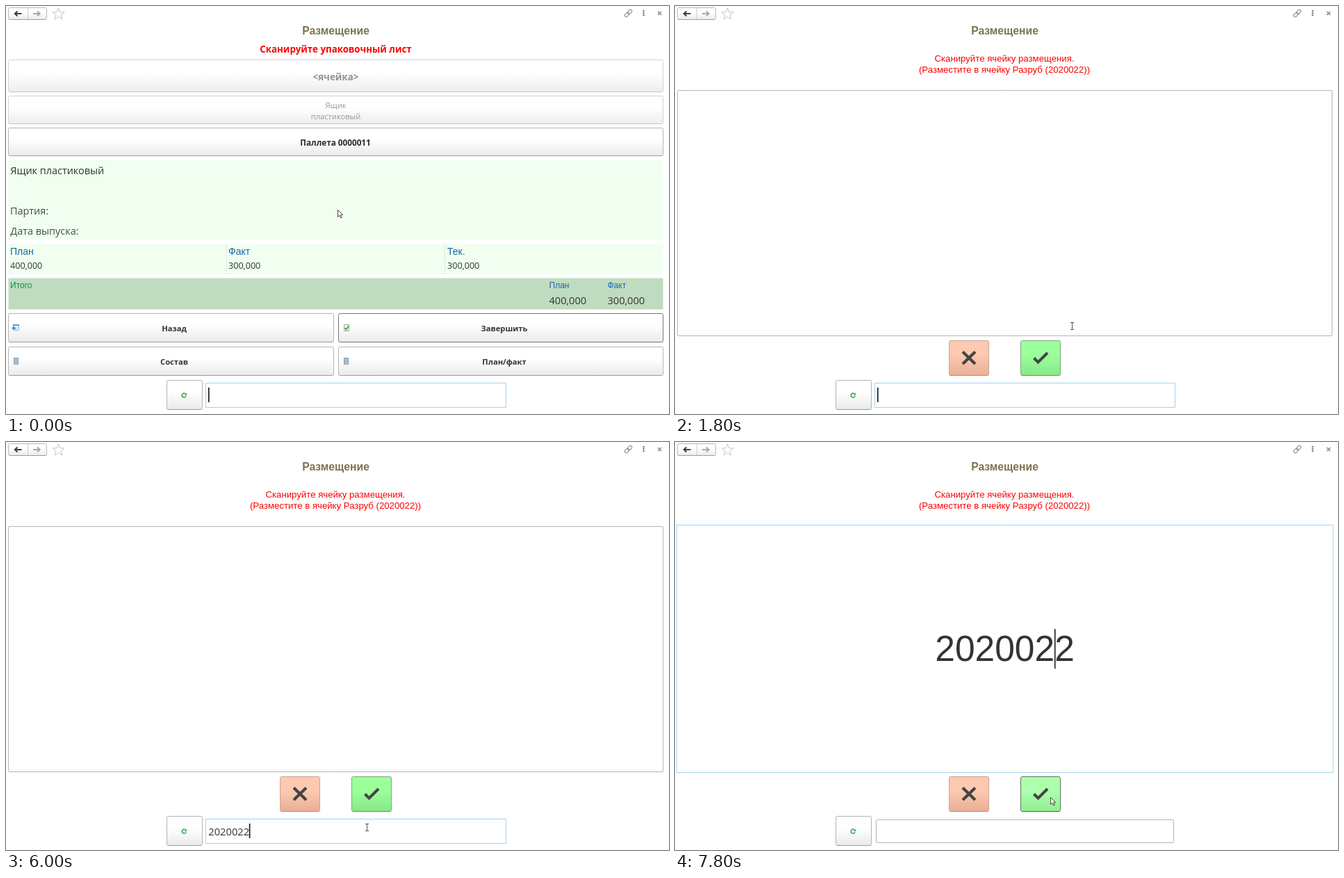
Recreate the animation shown at these times as an HTML page with a canvas. Size 954x587 px, loop 8 s.

```html
<!DOCTYPE html>
<html lang="ru">
<head>
<meta charset="utf-8">
<title>Размещение</title>
<style>
html, body { margin: 0; width: 100%; height: 100%; overflow: hidden; background: #fff; }
canvas { display: block; width: 954px; height: 587px; }
</style>
</head>
<body>
<canvas id="stage" width="954" height="587"></canvas>
<script>
const g = document.getElementById('stage').getContext('2d');
const LOOP = 8000;
const UI = '"Open Sans", "Noto Sans", sans-serif';
const ARIAL = '"Liberation Sans", Arial, sans-serif';
const CODE = '2020022';

// [start time, value...]; each row holds until the next one
const POINTER = [
  [0, 'arrow', 477, 293], [400, 'arrow', 482, 307], [600, 'arrow', 544, 417],
  [800, 'arrow', 567, 456], [1000, 'arrow', 569, 459], [1600, 'beam', 571, 460],
  [2600, 'arrow', 522, 531], [2800, 'beam', 519, 554], [3000, 'beam', 519, 556],
  [3200, 'beam', 519, 554], [6800, 'arrow', 542, 531], [7000, 'arrow', 555, 518],
  [7200, 'beam', 562, 419], [7400, 'beam', 563, 416], [7600, 'beam', 564, 434],
  [7800, 'arrow', 540, 511]
];
const TYPED = [[0, 0], [3600, 1], [3800, 2], [4800, 3], [5400, 4], [5600, 5], [6000, 7]];
const HOVER = [[0, false], [2400, true], [2800, false], [7800, true]];

const at = (rows, t) => rows.filter(r => r[0] <= t).pop().slice(1);

function text(str, x, y, font, color, align = 'left') {
  g.font = font;
  g.fillStyle = color;
  g.textAlign = align;
  g.fillText(str, x, y);
}

function rect(x, y, w, h, color) {
  g.fillStyle = color;
  g.fillRect(x, y, w, h);
}

function line(points, color, width, closed) {
  g.beginPath();
  points.forEach(([x, y]) => g.lineTo(x, y));
  if (closed) g.closePath();
  g.strokeStyle = color;
  g.lineWidth = width;
  g.stroke();
}

function frame(x, y, w, h, border, fill = '#fff', radius = 1.5) {
  g.beginPath();
  g.roundRect(x + .5, y + .5, w - 1, h - 1, radius);
  g.fillStyle = fill;
  g.fill();
  g.strokeStyle = border;
  g.lineWidth = 1;
  g.stroke();
}

function button(x, y, w, h, border = '#b4b4b4', top = '#fff', bottom = '#eaeaea', foot = '#9c9c9c') {
  const fill = g.createLinearGradient(0, y, 0, y + h);
  fill.addColorStop(0, top);
  fill.addColorStop(.4, top);
  fill.addColorStop(1, bottom);
  frame(x, y, w, h, border, fill, 2);
  rect(x + 2, y + h - 1, w - 4, 1, foot);
}

function navArrow(x, dir, color) {
  line([[x - 5 * dir, 11], [x + 4 * dir, 11]], color, 2);
  line([[x + dir, 7.5], [x + 4.7 * dir, 11], [x + dir, 14.5]], color, 2);
}

function toolbar() {
  button(3, 2, 56, 18, '#b8b8b8');
  rect(31, 3, 1, 16, '#cfcfcf');
  navArrow(17.5, -1, '#404040');
  navArrow(44, 1, '#a8a8a8');

  const star = [];
  for (let i = 0; i < 10; i++) {
    const r = i % 2 ? 3.7 : 9, a = i * Math.PI / 5 - Math.PI / 2;
    star.push([75.5 + r * Math.cos(a), 11.7 + r * Math.sin(a)]);
  }
  line(star, '#c4c4c4', 1, true);

  g.save();
  g.translate(895.5, 10.5);
  g.rotate(-Math.PI / 4);
  g.strokeStyle = '#858585';
  g.lineWidth = 1;
  for (const x of [-6.4, -.6]) {
    g.beginPath();
    g.roundRect(x, -2.2, 7, 4.4, 2.2);
    g.stroke();
  }
  g.restore();

  for (const y of [6, 9, 12]) rect(916.5, y, 2, 2, '#606060');
  line([[938, 8], [943, 13]], '#777', 1.1);
  line([[943, 8], [938, 13]], '#777', 1.1);
  text('Размещение', 474.5, 41, 'bold 15.7px ' + ARIAL, '#7b7350', 'center');
}

function backIcon(x, y) {
  frame(x + 1, y, 9, 9, '#74acd0', '#f3f9fd', 1);
  rect(x + 1, y, 9, 2, '#5a9cc8');
  line([[x, y + 5.5], [x + 6, y + 5.5]], '#1f7fc0', 1.5);
  line([[x + 3, y + 3.3], [x + .5, y + 5.5], [x + 3, y + 7.7]], '#1f7fc0', 1.2);
}

function doneIcon(x, y) {
  frame(x, y, 8, 10, '#9dac9d', '#eef5ee', 0);
  line([[x + 1.5, y + 5], [x + 3.5, y + 7.5], [x + 7, y + 2.5]], '#2e9e3c', 1.5);
}

function listIcon(x, y) {
  rect(x, y, 7, 10, '#869db3');
  for (let i = 0; i < 4; i++) rect(x + 1, y + 1.5 + i * 2.2, 5, 1, '#d3e2ef');
}

function scanField(t) {
  button(231, 538, 52, 43);
  g.beginPath();
  g.arc(256.3, 560.2, 3, .3, 5.3);
  g.strokeStyle = '#35a853';
  g.lineWidth = 1.5;
  g.stroke();
  g.beginPath();
  [[260, 556.5], [260, 560], [256.5, 560]].forEach(p => g.lineTo(...p));
  g.fillStyle = '#35a853';
  g.fill();

  if (t >= 6400) {
    frame(289, 543, 429, 34, '#b5b5b5');
    return;
  }
  frame(287, 542, 433, 36, '#a5d2ef', '#fff', 0);
  const str = CODE.slice(0, at(TYPED, t)[0]);
  text(str, 291.3, 566, '14.7px ' + UI, '#333');
  const x = 291 + g.measureText(str).width;
  rect(x, 549, 1.6, 21, '#111');
}

function summary() {
  const bold = s => `bold ${s}px ${UI}`, plain = s => `${s}px ${UI}`;
  text('Сканируйте упаковочный лист', 474.5, 67, bold(13.3), '#f00', 'center');

  button(3, 77, 943, 47, '#d2d2d2', '#fff', '#ededed', '#c4c4c4');
  text('<ячейка>', 474.5, 106.5, bold(13.4), '#929292', 'center');
  button(3, 129, 943, 41, '#d2d2d2', '#fff', '#ededed', '#c4c4c4');
  text('Ящик', 474.5, 146.5, plain(11.2), '#969696', 'center');
  text('пластиковый', 474.5, 163, plain(11.2), '#969696', 'center');
  button(3, 175, 943, 41);
  text('Паллета 0000011', 474, 200.5, bold(11.75), '#2b2b2b', 'center');

  rect(3.5, 222, 942, 114, '#f0fff0');
  text('Ящик пластиковый', 6.3, 242, plain(14.45), '#333');
  text('Партия:', 6, 300, plain(14.45), '#4a4a4a');
  text('Дата выпуска:', 6.3, 328.5, plain(14.45), '#4a4a4a');

  rect(3.5, 342, 942, 44, '#f0fff0');
  for (const x of [317, 631])
    for (let y = 344; y < 385; y += 3) rect(x, y, 1, 2, '#d3e0d3');
  [['План', '400,000', 6], ['Факт', '300,000', 320], ['Тек.', '300,000', 635]].forEach(([name, num, x]) => {
    text(name, x, 358, '14px ' + ARIAL, '#1c66ae');
    text(num, x, 378.3, plain(12.6), '#333');
  });

  rect(3.5, 391.5, 942, 45, '#c0dcc0');
  text('Итого', 6, 406, '12px ' + ARIAL, '#009646');
  [['План', '400,000', 781.5], ['Факт', '300,000', 865.5]].forEach(([name, num, x]) => {
    text(name, x, 406, '12px ' + ARIAL, '#1c66ae');
    text(num, x, 428.7, plain(14.6), '#333');
  });

  [['Назад', 3, 442, backIcon], ['Завершить', 478, 442, doneIcon],
   ['Состав', 3, 490, listIcon], ['План/факт', 478, 490, listIcon]].forEach(([name, x, y, icon]) => {
    const active = icon === doneIcon;
    button(x, y, x < 400 ? 469 : 468, 42, active ? '#777' : '#b4b4b4', '#fff', '#eaeaea', active ? '#777' : '#9c9c9c');
    icon(x + (icon === backIcon ? 6 : 8), y + 16);
    text(name, x + 239, y + 26, bold(11.2), '#333', 'center');
  });
}

function cellEntry(t) {
  const font = '13.2px ' + ARIAL;
  text('Сканируйте ячейку размещения.', 474, 80, font, '#f00', 'center');
  text('(Разместите в ячейку Разруб (2020022))', 474, 95.5, font, '#f00', 'center');

  if (t < 6400) {
    frame(3, 121, 943, 354, '#b5b5b5');
  } else {
    const selected = t < 7600;
    frame(2, 119, 945.5, 357, '#a5d2ef', '#fff', 0);
    if (selected) {
      rect(374, 269, 201, 57, '#5068c0');
      rect(374, 269, 1, 57, '#b09a45');
    }
    text(CODE, 374.3, 315, '51.5px ' + ARIAL, selected ? '#fff' : '#333');
    if (!selected) rect(546, 269, 1.5, 57, '#111');
  }

  button(394, 481, 58, 51, '#c3a596', '#fdc9b1', '#eaae96', '#ad8b7c');
  line([[414, 497.5], [432, 515]], '#444', 4.2);
  line([[432, 497.5], [414, 515]], '#444', 4.2);

  if (at(HOVER, t)[0]) button(497, 481, 58, 51, '#5c7a5c', '#adffad', '#92ec92', '#4f6b4f');
  else button(497, 481, 58, 51, '#79a979', '#9bff9b', '#87e787', '#639163');
  line([[516.5, 506.5], [522.5, 512.5], [536, 499]], '#444', 4);
}

function pointer(t) {
  const [kind, x, y] = at(POINTER, t);
  g.save();
  g.translate(x + .5, y + .5);
  if (kind === 'arrow') {
    g.beginPath();
    [[0, 0], [0, 9.8], [2.3, 7.8], [4, 11.4], [5.7, 10.7], [4.1, 7.2], [7.1, 7]].forEach(p => g.lineTo(...p));
    g.closePath();
    g.fillStyle = '#fff';
    g.fill();
    g.strokeStyle = '#444';
    g.lineWidth = 1;
    g.stroke();
  } else {
    line([[0, -4.5], [0, 4.5]], '#555', 1);
    for (const s of [-5, 5]) line([[-2.5, s], [2.5, s]], '#555', 1);
  }
  g.restore();
}

function draw(now) {
  const t = now % LOOP;
  rect(0, 0, 954, 587, '#fff');
  toolbar();
  if (t < 1800) summary();
  else cellEntry(t);
  scanField(t);
  pointer(t);
}

const start = performance.now();
function tick() {
  draw(performance.now() - start);
  requestAnimationFrame(tick);
}
tick();
</script>
</body>
</html>
```
